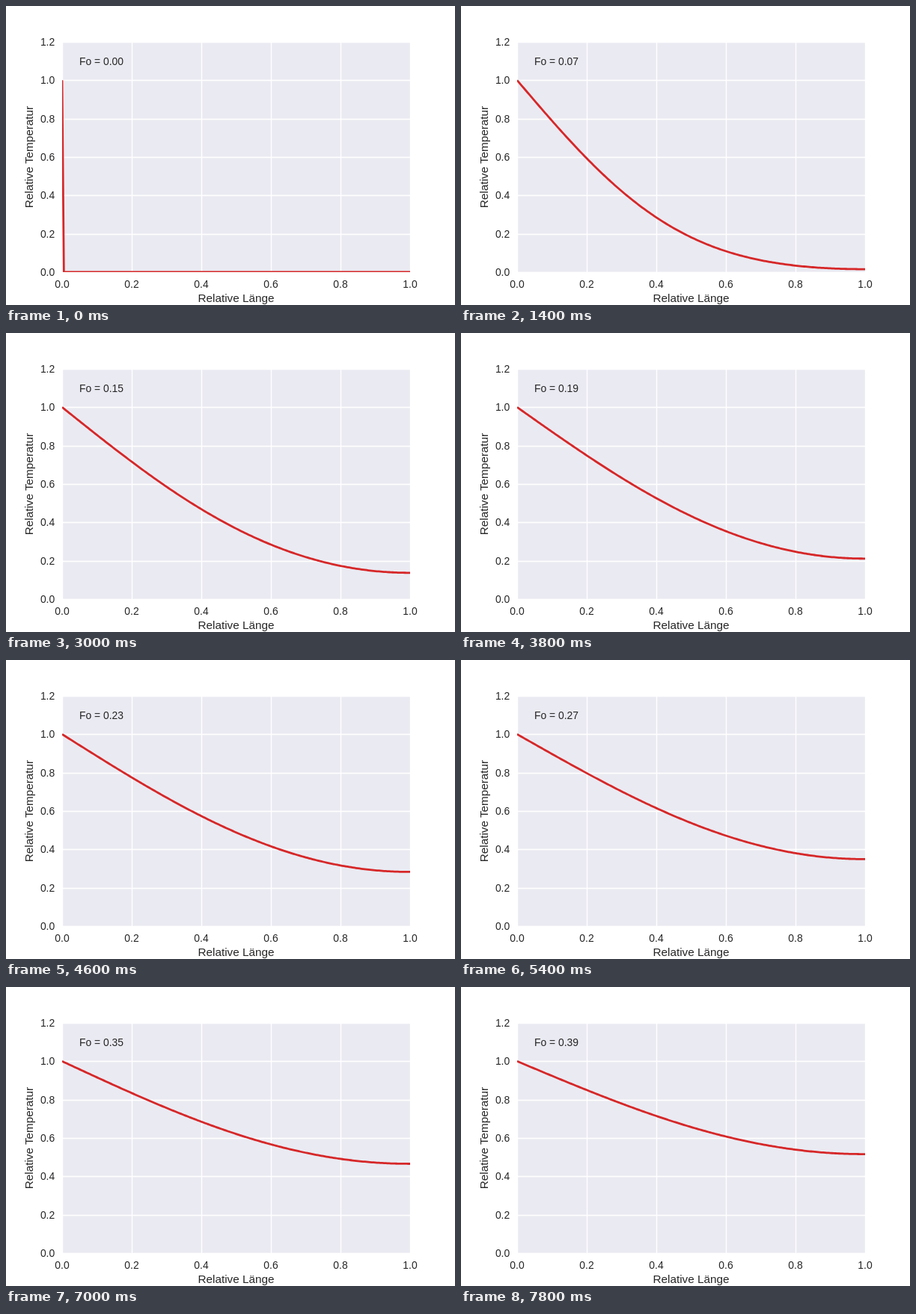
An HTML page for the animation above (8 s loop, 600 by 400 pixels).

```html
<!DOCTYPE html>
<html lang="de">
<head>
<meta charset="utf-8">
<title>Relative Temperatur</title>
<style>
  html, body { margin: 0; width: 100%; height: 100%; overflow: hidden; background: #fff; }
  svg { display: block; width: 100%; height: 100%; }
  text { font: 13.89px "Liberation Sans", Arial, sans-serif; fill: #262626; }
  .axis { font-size: 15.28px; text-anchor: middle; }
  #grid { stroke: #fff; stroke-width: 1.39; }
  #curve { fill: none; stroke: #d62728; stroke-width: 2.78; stroke-linejoin: round; }
</style>
</head>
<body>
<svg viewBox="0 0 600 400">
  <clipPath id="plot"><rect x="75" y="48" width="465" height="308"/></clipPath>
  <rect x="75" y="48" width="465" height="308" fill="#eaeaf2"/>
  <g clip-path="url(#plot)">
    <path id="grid"/>
    <path id="curve"/>
  </g>
  <g id="ticks"></g>
  <text class="axis" x="307.5" y="396">Relative Länge</text>
  <text class="axis" transform="translate(36 202) rotate(-90)">Relative Temperatur</text>
  <text id="fourier" x="98" y="79"></text>
</svg>
<script>
const STEP_MS = 200, STEPS = 40;
const CELLS = 200, LENGTH = 1 - 0.5 / CELLS; // insulated end lies half a cell inside
const TERMS = 30;

const byId = id => document.getElementById(id);
const px = x => 75 + 465 * x;
const py = y => 356 - 308 * y / 1.2;
const snap = v => Math.floor(v + 0.5) + 0.5;

function addTick(value, x, y, anchor) {
  const label = document.createElementNS("http://www.w3.org/2000/svg", "text");
  label.setAttribute("x", x);
  label.setAttribute("y", y);
  label.setAttribute("text-anchor", anchor);
  label.textContent = value.toFixed(1);
  byId("ticks").append(label);
}

function drawAxes() {
  let grid = "";
  for (let i = 0; i <= 6; i++) {
    const v = i / 5;
    grid += `M75 ${snap(py(v))}H540`;
    addTick(v, 65.2, Math.round(py(v) + 5), "end");
    if (i > 5) continue;
    grid += `M${snap(px(v))} 48V356`;
    addTick(v, px(v), 377, "middle");
  }
  byId("grid").setAttribute("d", grid);
}

// Fourier series of a rod heated at x = 0
function temperature(x, fo) {
  if (fo === 0) return x === 0 ? 1 : 0;
  let sum = 0;
  for (let n = 0; n < TERMS; n++) {
    const k = (n + 0.5) * Math.PI / LENGTH;
    sum += 2 / (k * LENGTH) * Math.sin(k * x) * Math.exp(-k * k * fo);
  }
  return 1 - sum;
}

function drawStep(step) {
  const fo = step / 100;
  const points = Array.from({ length: CELLS + 1 }, (_, i) => {
    const x = i / CELLS;
    return `${px(x).toFixed(2)} ${py(temperature(x, fo)).toFixed(2)}`;
  });
  byId("curve").setAttribute("d", "M" + points.join("L"));
  byId("fourier").textContent = `Fo = ${fo.toFixed(2)}`;
}

const start = performance.now();
let shown = -1;
function tick() {
  const step = Math.floor((performance.now() - start) / STEP_MS) % STEPS;
  if (step !== shown) drawStep(shown = step);
  requestAnimationFrame(tick);
}

drawAxes();
tick();
</script>
</body>
</html>
```
